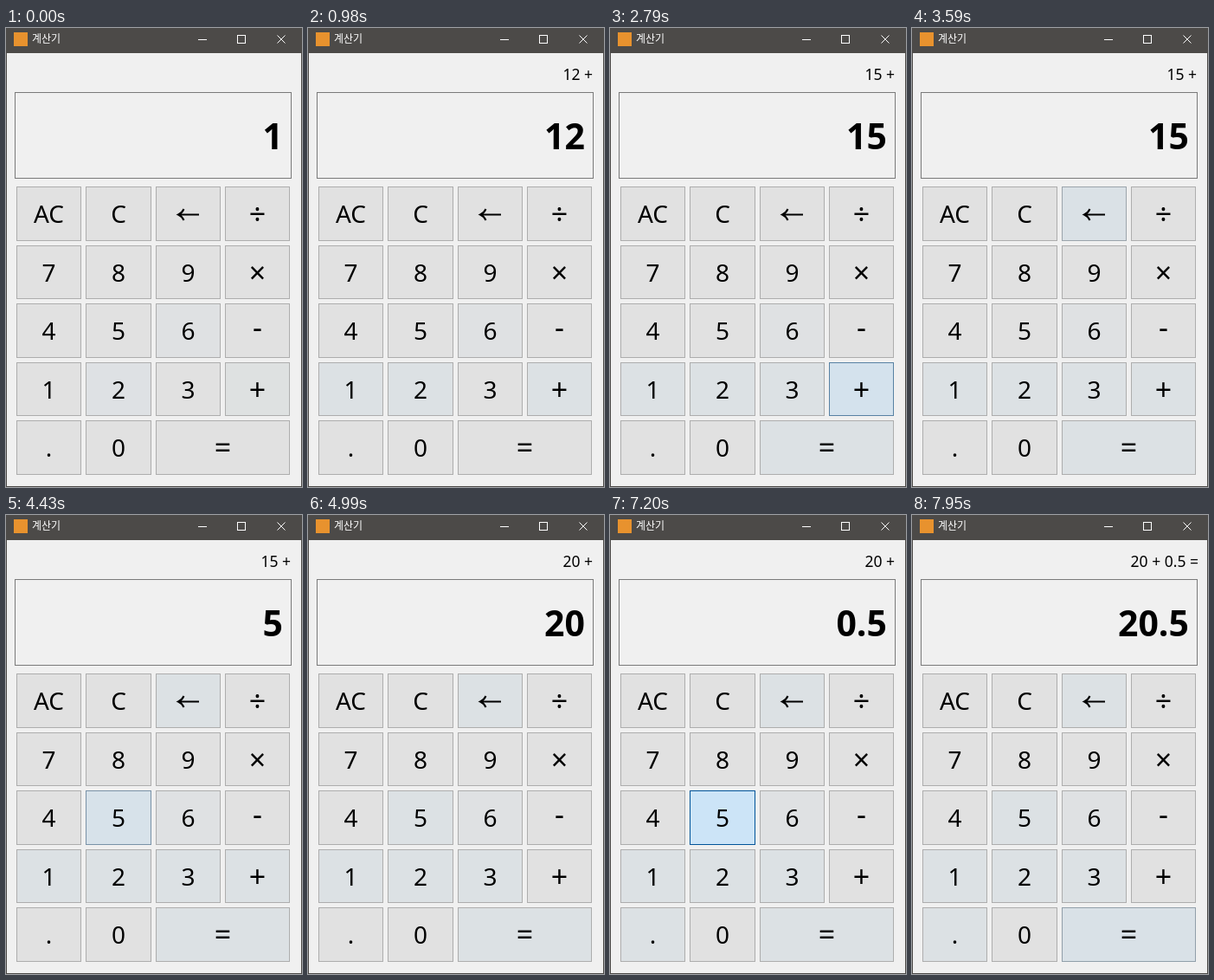
An HTML page for the animation above (8000 ms loop, 342 by 530 pixels).

```html
<!DOCTYPE html>
<html lang="ko">
<head>
<meta charset="utf-8">
<title>계산기</title>
<style>
  html, body { margin: 0; width: 100%; height: 100%; overflow: hidden; background: #f0f0f0; }
  svg { display: block; }
  text { font-family: "Noto Sans", "Open Sans", sans-serif; fill: #000; }
  .title { font: 12px "Noto Sans CJK KR", "Noto Sans CJK", sans-serif; fill: #fff; }
  .key { font-size: 28px; text-anchor: middle; }
  .sign { font-size: 34px; text-anchor: middle; }
  #expression { font-size: 17.5px; text-anchor: end; }
  #display { font-size: 41px; font-weight: 700; text-anchor: end; }
</style>
</head>
<body>
<svg width="342" height="530" viewBox="0 0 342 530">
  <rect width="342" height="530" fill="#4c4a48"/>
  <rect x="1" y="29" width="340" height="500" fill="#f0f0f0"/>
  <rect x="9" y="5" width="16" height="16" fill="#e8922e"/>
  <text class="title" x="30" y="17">계산기</text>
  <g fill="none" stroke="#fff">
    <path d="M222 13.5h10M267.5 8.5h9v9h-9z" shape-rendering="crispEdges"/>
    <path d="M313.5 8.5l9 9m0-9l-9 9"/>
  </g>
  <text id="expression" y="60"></text>
  <rect x="10.5" y="74.5" width="319" height="99" fill="#f0f0f0" stroke="#7a7a7a"/>
  <text id="display" x="320" y="140"></text>
  <g id="keys"></g>
</svg>
<script>
const LOOP = 8000;
const PLAIN = [225, 225, 225], VISITED = [220, 225, 228], PRESSED = [204, 228, 247];
const EDGE = [173, 173, 173], PRESSED_EDGE = [0, 84, 153];

const columns = [[12, 87], [92, 168], [173, 248], [253, 328]];
const rows = [[183, 246], [251, 313], [318, 381], [386, 448], [453, 516]];
const layout = [
  ['AC', 'C', '←', '÷'],
  ['7', '8', '9', '×'],
  ['4', '5', '6', '-'],
  ['1', '2', '3', '+'],
  ['.', '0', '=']
];
const initialFill = { 2: [222, 225, 228], 6: [223, 225, 227], '+': [222, 225, 225] };

// Omitted display or expression values keep the previous text.
const presses = [
  { at: 70, key: '1' },
  { at: 330, key: '2', display: '12' },
  { at: 630, key: '+', expression: '12 +' },
  { at: 1120, key: '3', display: '3' },
  { at: 1470, key: '=', display: '15', expression: '12 + 3 =' },
  { at: 2580, key: '+', expression: '15 +' },
  { at: 3310, key: '←' },
  { at: 3730, key: '←' },
  { at: 4185, key: '5', display: '5' },
  { at: 4600, key: '+', display: '20', expression: '20 +', rest: PLAIN },
  { at: 6050, key: '.', display: '0.' },
  { at: 7130, key: '5', display: '0.5' },
  { at: 7680, key: '=', display: '20.5', expression: '20 + 0.5 =' }
];

const byId = id => document.getElementById(id);
const clamp = v => Math.max(0, Math.min(1, v));
const mix = (a, b, k) => `rgb(${a.map((v, i) => Math.round(v + (b[i] - v) * k))})`;

function add(tag, attributes, content = '') {
  const node = document.createElementNS('http://www.w3.org/2000/svg', tag);
  for (const name in attributes) node.setAttribute(name, attributes[name]);
  node.textContent = content;
  return byId('keys').appendChild(node);
}

const keys = {};
layout.forEach((labels, row) => labels.forEach((label, column) => {
  const [top, bottom] = rows[row];
  const left = columns[column][0];
  const right = label === '=' ? 328 : columns[column][1];
  const x = (left + right) / 2, y = (top + bottom) / 2;
  keys[label] = add('rect', {
    x: left + 0.5, y: top + 0.5, width: right - left - 1, height: bottom - top - 1
  });
  if (label === '←') {
    add('path', {
      d: `M${x + 12.5} ${y + 1}h-24m6.5-6.5q-2 4.5-6.5 6.5q4.5 2 6.5 6.5`,
      fill: 'none', stroke: '#000', 'stroke-width': 2
    });
  } else {
    const sign = '÷×-+='.includes(label);
    const drop = label === '-' ? 8.5 : sign ? 12.5 : 10.5;
    add('text', { class: sign ? 'sign' : 'key', x, y: y + drop }, label);
  }
}));

const pressure = age => clamp(age / 70) * clamp((300 - age) / 180);

function render(time) {
  let display = '1', expression = '';
  const states = {};
  for (const label in keys) states[label] = { fill: initialFill[label] || PLAIN, amount: 0 };

  for (const press of presses) {
    const age = time - press.at;
    if (age < 0) break;
    display = press.display ?? display;
    expression = press.expression ?? expression;
    const state = states[press.key];
    state.amount = pressure(age);
    if (age >= 70) state.fill = press.rest || VISITED;
  }

  for (const label in keys) {
    const { fill, amount } = states[label];
    keys[label].setAttribute('fill', mix(fill, PRESSED, amount));
    keys[label].setAttribute('stroke', mix(EDGE, PRESSED_EDGE, amount));
  }
  byId('display').textContent = display;
  byId('expression').textContent = expression;
  byId('expression').setAttribute('x', expression.endsWith('=') ? 331 : 329);
}

const start = performance.now();
function tick() {
  render((performance.now() - start) % LOOP);
  requestAnimationFrame(tick);
}
tick();
</script>
</body>
</html>
```
